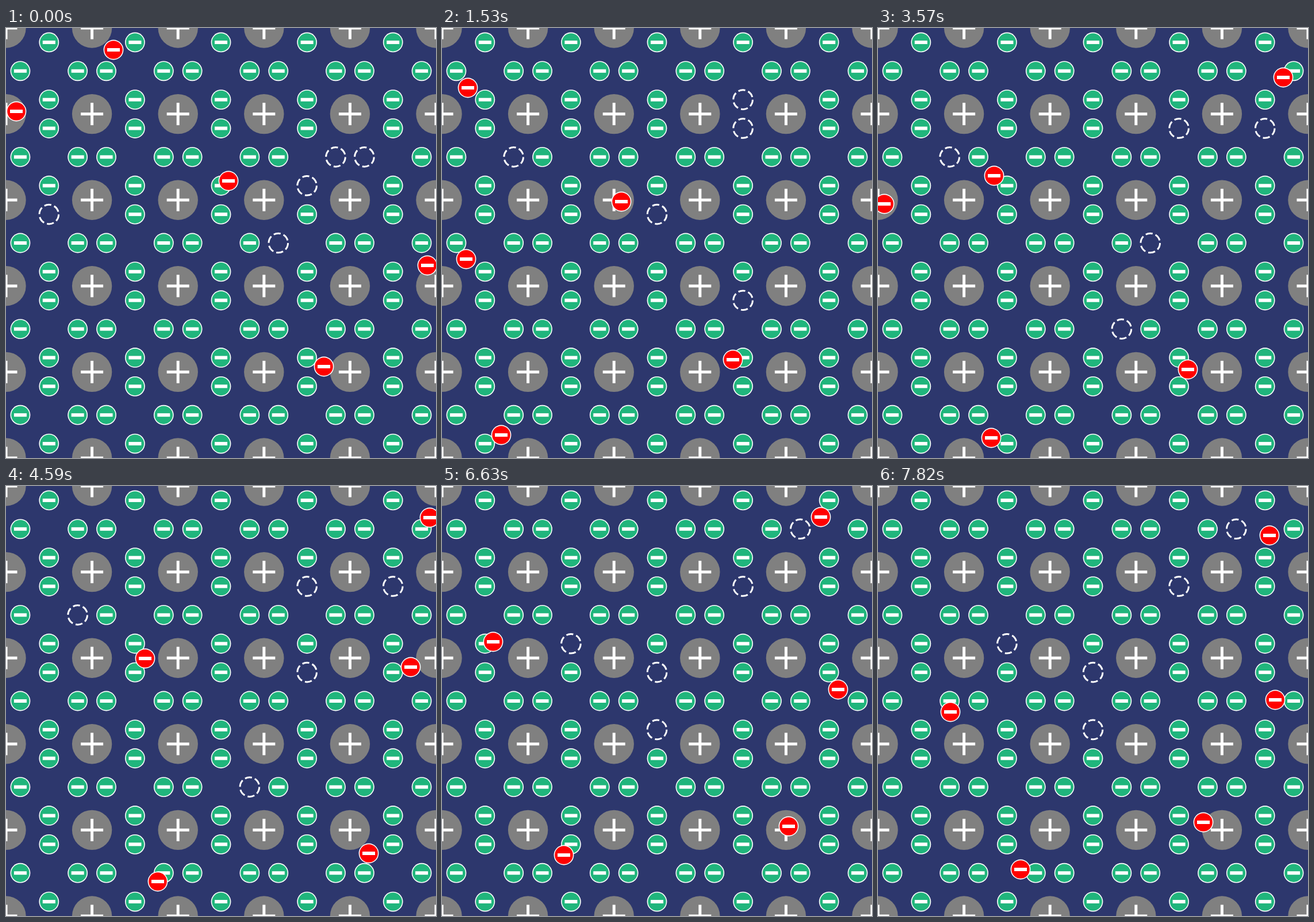
These frames come from a looping animation (748x748 px, 7.99 s). An HTML page with a canvas:

```html
<!DOCTYPE html>
<html lang="en">
<head>
<meta charset="utf-8">
<title>Electrons and holes in a crystal lattice</title>
<style>
  html, body { margin: 0; height: 100%; overflow: hidden; background: #2d376d; }
  canvas { display: block; }
</style>
</head>
<body>
<canvas id="stage" width="748" height="748"></canvas>
<script>
const SIZE = 748, STEP_MS = 170, STEPS = 47;
const CELL = SIZE / 5, PITCH = CELL / 3, SITES_PER_SIDE = 15;
const ctx = document.getElementById('stage').getContext('2d');

// Free electrons drift between a few points in pixels and wrap at the edges.
const driftSteps = [0, 9, 21, 27, 33, 39, 46];
const drifts = [
  [[187, 38], [103, -40], [197, -35], [264, -60], [256, -98], [212, -106], [248, -81]],
  [[18, 145], [45, 104], [-43, 86], [-11, 55], [-22, 37], [-89, 54], [-67, 86]],
  [[387, 266], [312, 302], [202, 257], [242, 300], [151, 279], [89, 271], [126, 393]],
  [[733, 413], [790, 402], [759, 306], [704, 315], [677, 290], [689, 354], [691, 372]],
  [[553, 589], [506, 577], [539, 594], [631, 639], [610, 578], [603, 592], [566, 585]]
];

// Holes wander between a few lattice sites, given as column and row.
const hopSteps = [0, 9, 21, 33, 39];
const hops = [
  [[1, 6], [2, 4], [2, 4], [2, 4], [4, 5]],
  [[10, 5], [7, 6], [9, 7], [10, 5], [7, 6]],
  [[9, 7], [10, 9], [8, 10], [8, 10], [7, 8]],
  [[11, 4], [10, 2], [10, 3], [11, 4], [10, 3]],
  [[12, 4], [10, 3], [13, 3], [12, 4], [12, 1]]
];

const isBond = (col, row) => (col % 3 === 1) !== (row % 3 === 1);
const sitePos = i => (i + 0.5) * PITCH;
const wrap = v => ((v % SIZE) + SIZE) % SIZE;

const sites = [];
for (let row = 0; row < SITES_PER_SIDE; row++)
  for (let col = 0; col < SITES_PER_SIDE; col++)
    if (isBond(col, row)) sites.push([col, row]);

function pointAt(steps, points, step) {
  const next = steps.findIndex(s => s > step);
  if (next < 0) return points[points.length - 1];
  const k = (step - steps[next - 1]) / (steps[next] - steps[next - 1]);
  return points[next].map((to, axis) => {
    const from = points[next - 1][axis];
    return from + (to - from) * k;
  });
}

function nearestSite([x, y]) {
  const distance = s => Math.hypot(s[0] - x, s[1] - y);
  return sites.reduce((best, s) => distance(s) < distance(best) ? s : best);
}

function disc(x, y, r, color) {
  ctx.beginPath();
  ctx.arc(x, y, r, 0, 2 * Math.PI);
  ctx.fillStyle = color;
  ctx.fill();
}

function bar(x, y, w, h) {
  ctx.fillStyle = '#fff';
  ctx.fillRect(x - w / 2, y - h / 2, w, h);
}

function ion(x, y) {
  disc(x, y, 34.7, '#808080');
  bar(x, y, 39, 5);
  bar(x, y, 5, 39);
}

function electron(x, y, color) {
  disc(x, y, 17.4, '#fff');
  disc(x, y, 15.8, color);
  bar(x, y, 22, 6);
}

function hole(x, y) {
  const radius = 16.8, period = 2 * Math.PI * radius / 6;
  ctx.beginPath();
  ctx.arc(x, y, radius, 0, 2 * Math.PI);
  ctx.setLineDash([period * 0.7, period * 0.3]);
  ctx.lineWidth = 3;
  ctx.strokeStyle = '#fff';
  ctx.stroke();
}

function draw(now) {
  const step = Math.floor(now / STEP_MS) % STEPS;
  ctx.fillStyle = '#2d376d';
  ctx.fillRect(0, 0, SIZE, SIZE);

  for (let row = 0; row <= 5; row++)
    for (let col = 0; col <= 5; col++) ion(col * CELL, row * CELL);

  const empty = new Set(hops.map(path => nearestSite(pointAt(hopSteps, path, step))));
  for (const site of sites) {
    const [x, y] = site.map(sitePos);
    if (empty.has(site)) hole(x, y);
    else electron(x, y, '#20b57c');
  }

  for (const path of drifts) {
    const [x, y] = pointAt(driftSteps, path, step).map(wrap);
    electron(x, y, '#f00');
  }
}

const start = performance.now();
function tick() {
  draw(performance.now() - start);
  requestAnimationFrame(tick);
}
tick();
</script>
</body>
</html>
```
